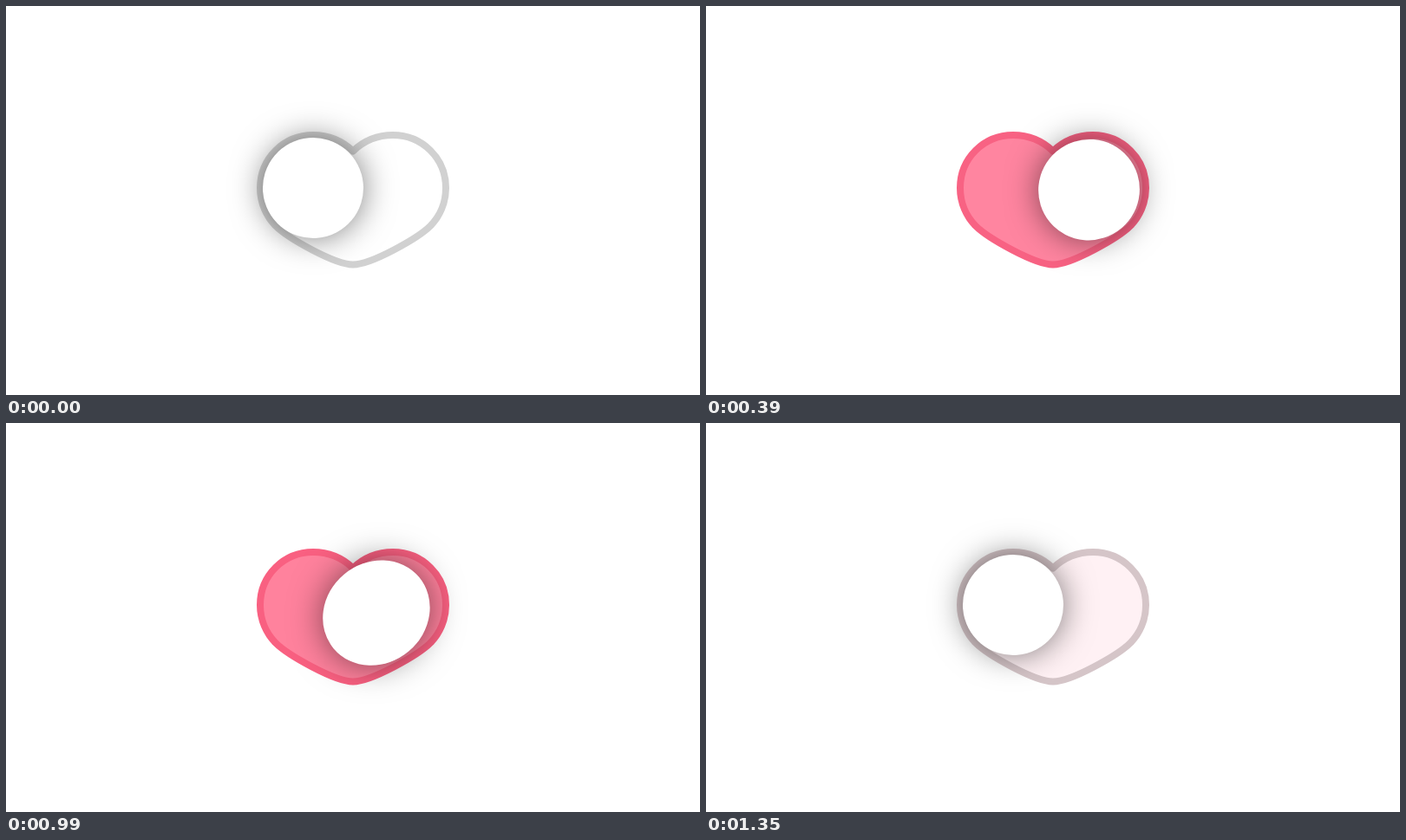
Animation, 800 px wide and 449 px high, one loop 1800 ms. Source, as an HTML page:

```html
<!DOCTYPE html>
<html lang="en">
<head>
<meta charset="utf-8">
<title>Heart switch</title>
<style>
  html, body { margin: 0; width: 100%; height: 100%; overflow: hidden; background: #fff; }
  svg { position: absolute; left: 0; top: 0; }
  #heart { stroke-width: 8; stroke-linejoin: round; }
  #knob {
    position: absolute; left: -58px; top: -58px; width: 116px; height: 116px;
    border-radius: 50%; background: #fff; box-shadow: 0 0 36px rgba(0, 0, 0, .5);
  }
</style>
</head>
<body>
<svg width="800" height="449" viewBox="0 0 800 449">
  <path id="heart" d="M400 167.5C388 156 372 149 354 149C320 149 293 176 293 210
    C293 227 300 243 311 254C325 268 379 298.5 400 298.5
    C421 298.5 475 268 489 254C500 243 507 227 507 210
    C507 176 480 149 446 149C428 149 412 156 400 167.5Z"/>
</svg>
<div id="knob"></div>
<script>
const LOOP = 1800, STEP = 30, LAST = 1350;
const SWITCH_OFF = 905, MOVE = 410, FADE = 705;
const heart = document.getElementById('heart');
const knob = document.getElementById('knob');

const clamp = v => Math.min(1, Math.max(0, v));
const bezier = (a, b, u) => 3 * a * u * (1 - u) ** 2 + 3 * b * u * u * (1 - u) + u ** 3;

// The CSS "ease" curve
function ease(x) {
  let low = 0, high = 1;
  for (let i = 0; i < 24; i++) {
    const mid = (low + high) / 2;
    if (bezier(.25, .25, mid) < x) low = mid; else high = mid;
  }
  return bezier(.1, 1, low);
}

const mix = (from, to, k) => `rgb(${from.map((v, i) => v + (to[i] - v) * k)})`;

function draw(time) {
  const t = Math.min(LAST, Math.floor(time / STEP) * STEP);
  const on = t < SWITCH_OFF;
  const elapsed = on ? t : t - SWITCH_OFF;
  const progress = duration => {
    const p = clamp(elapsed / duration);
    return duration === FADE ? ease(p) : p;
  };
  const directed = p => on ? p : 1 - p;

  const tint = directed(progress(FADE));
  heart.style.fill = mix([255, 255, 255], [255, 111, 143], tint);
  heart.style.stroke = mix([209, 209, 209], [255, 79, 117], tint);

  // The knob dips through the tip of the heart and stretches along each half
  const place = directed(progress(MOVE));
  const x = 354 + 92 * place;
  const y = 232 - 22 * Math.abs(2 * place - 1);
  const stretch = 1 + .115 * Math.sin(2 * Math.PI * place) ** 2;
  const tilt = place < .5 ? 40 : -40;
  knob.style.transform =
    `translate(${x}px, ${y}px) rotate(${tilt}deg) scaleX(${stretch})`;
}

const start = performance.now();
function tick() {
  draw((performance.now() - start) % LOOP);
  requestAnimationFrame(tick);
}
tick();
</script>
</body>
</html>
```
